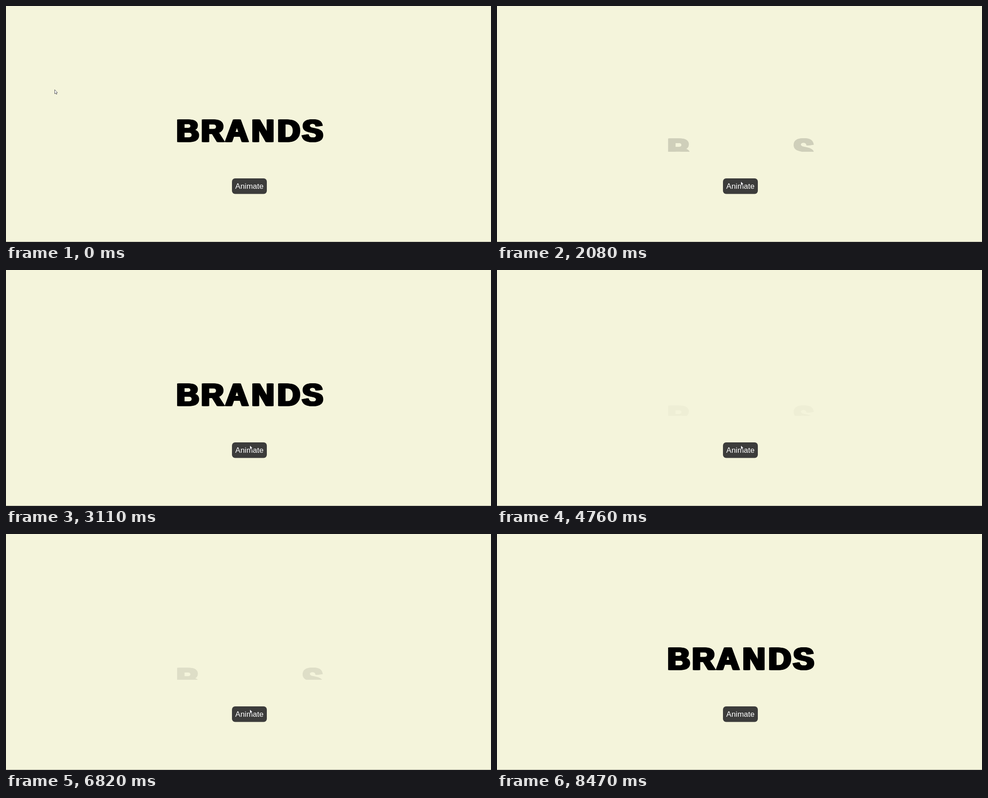
Write an HTML page with a canvas that moves like this. It is 1071 px wide and 523 px high and loops after 8.97 s.

```html
<!DOCTYPE html>
<html lang="en">
<head>
<meta charset="utf-8">
<title>Brands</title>
<style>
  html, body { margin: 0; height: 100%; overflow: hidden; background: #f4f4db; }
  canvas { display: block; }
</style>
</head>
<body>
<canvas id="stage" width="1071" height="523"></canvas>
<script>
const ctx = document.getElementById('stage').getContext('2d');
const LOOP = 8970;
const BG = [244, 244, 219];

// Word: each letter is centred on its ink
const WORD = 'BRANDS';
const CENTERS = [402, 457.5, 510, 567.5, 625, 676.5];
const BASELINE = 299.8, CLIP_BOTTOM = 323;

// Reveal: letters rise from below, outer ones first
const STARTS = [2050, 4755, 6802];
const DURATION = 900, STAGGER = 80, RISE = 50;

const clamp = v => Math.min(1, Math.max(0, v));
const span = (t, from, to) => clamp((t - from) / (to - from));
const easeOut = (u, power) => 1 - (1 - u) ** power;
const smooth = u => u * u * (3 - 2 * u);

function backOut(p) {
  const q = p - 1;
  return 1 + q * q * (2.7 * q + 1.7);
}

function bezier(u, a, b, c, d) {
  const v = 1 - u;
  return [0, 1].map(k =>
    v * v * v * a[k] + 3 * v * v * u * b[k] + 3 * v * u * u * c[k] + u * u * u * d[k]);
}

function cursorAt(t) {
  if (t < 1275) {
    const u = easeOut(span(t, 380, 1275), 1.83);
    return bezier(u, [107, 185], [107, 335], [300, 325], [523, 371]);
  }
  if (t < 7660) {
    const u = easeOut(span(t, 1275, 1620), 1.6);
    return [523 + 15 * u, 371 + 17 * u];
  }
  return bezier(smooth(span(t, 7660, 8470)), [538, 388], [700, 365], [850, 398], [986, 524]);
}

// Thickens the bold face, more across than down, into a black weight
function drawHeavy(letter, x, y) {
  for (const dx of [-1.7, 0, 1.7]) {
    ctx.fillText(letter, x + dx, y);
    ctx.strokeText(letter, x + dx, y);
  }
}

function drawWord(t) {
  const start = STARTS.filter(s => s <= t).pop();
  ctx.save();
  ctx.beginPath();
  ctx.rect(0, 0, 1071, CLIP_BOTTOM);
  ctx.clip();
  ctx.font = 'bold 69px "Liberation Sans", Arial, sans-serif';
  ctx.textAlign = 'left';
  ctx.lineWidth = 3;
  ctx.miterLimit = 4;
  [...WORD].forEach((letter, i) => {
    const delay = STAGGER * Math.min(i, WORD.length - 1 - i);
    const e = start === undefined ? 1 : backOut(clamp((t - start - delay) / DURATION));
    if (e <= 0) return;
    const ink = ctx.measureText(letter);
    const x = CENTERS[i] - (ink.actualBoundingBoxRight - ink.actualBoundingBoxLeft) / 2;
    const shade = BG.map(c => Math.round(c * (1 - clamp(e))));
    ctx.fillStyle = ctx.strokeStyle = `rgb(${shade})`;
    drawHeavy(letter, x, BASELINE + RISE * (1 - e));
  });
  ctx.restore();
}

function drawButton() {
  ctx.fillStyle = '#3c3c3b';
  ctx.beginPath();
  ctx.roundRect(499, 382, 77, 34.5, 7);
  ctx.fill();
  ctx.fillStyle = '#fff';
  ctx.font = '17px "Liberation Sans", Arial, sans-serif';
  ctx.textAlign = 'center';
  ctx.fillText('Animate', 537.5, 405);
}

const ARROW = new Path2D('M.5 .5V9.6L2.6 7.7L4 10.7L5.4 10.1L4.1 7.1H6.7Z');

function drawCursor([x, y]) {
  ctx.save();
  ctx.translate(Math.round(x), Math.round(y));
  ctx.fillStyle = '#fff';
  ctx.strokeStyle = '#33333a';
  ctx.lineWidth = 0.8;
  ctx.fill(ARROW);
  ctx.stroke(ARROW);
  ctx.restore();
}

function draw(now) {
  const t = now % LOOP;
  ctx.fillStyle = `rgb(${BG})`;
  ctx.fillRect(0, 0, 1071, 523);
  drawWord(t);
  drawButton();
  if (t < 8470) drawCursor(cursorAt(t));
  ctx.fillStyle = '#a9a99b';
  ctx.fillRect(0, 522, 1071, 1);
}

let began;
function tick(now) {
  began ??= now;
  draw(now - began);
  requestAnimationFrame(tick);
}
draw(0);
requestAnimationFrame(tick);
</script>
</body>
</html>
```
